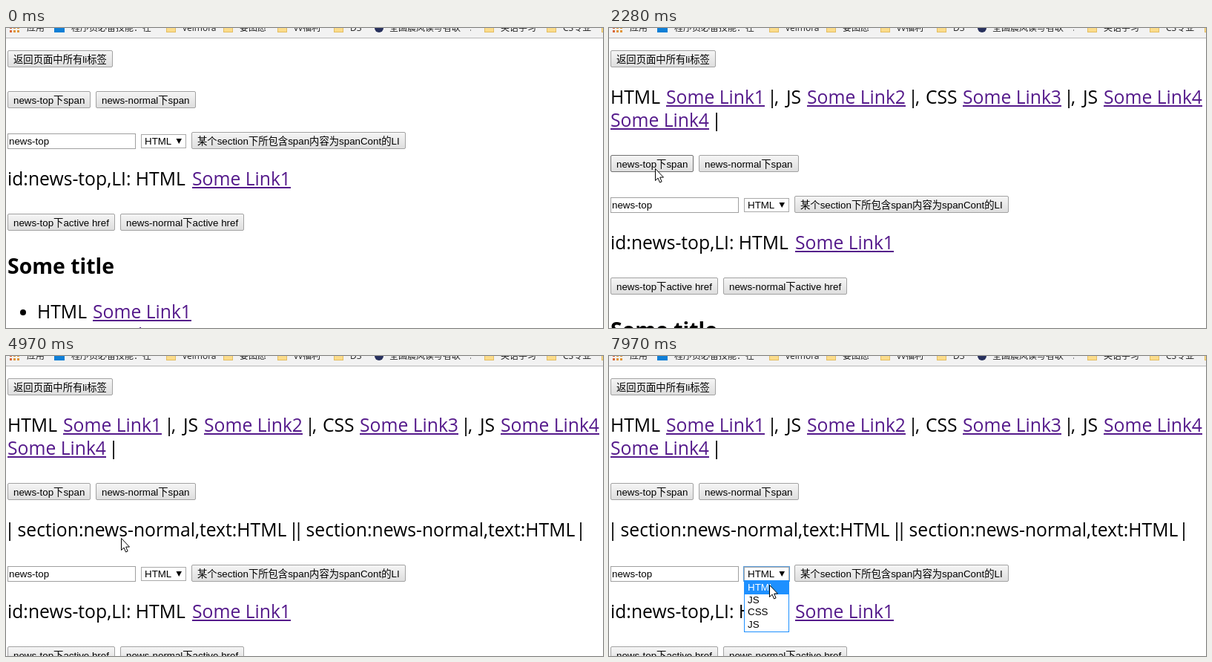
An HTML page with a canvas for the animation above (8 s loop, 805 px wide and 404 px high).

```html
<!DOCTYPE html>
<html lang="zh">
<head>
<meta charset="utf-8">
<style>
html, body { margin: 0; width: 100%; height: 100%; overflow: hidden; background: #fff; }
canvas { display: block; }
</style>
</head>
<body>
<canvas id="stage" width="805" height="404"></canvas>
<script>
const ctx = document.getElementById('stage').getContext('2d', { alpha: false });
const LOOP = 8000;
const CJK = '"Noto Sans CJK SC", "Noto Sans CJK JP", "Noto Sans CJK", sans-serif';
const BODY = '24.7px "Open Sans", ' + CJK;
const TITLE = 'bold 28.4px "Open Sans", ' + CJK;
const FORM = '13.333px "Liberation Sans", ' + CJK;
const MENU = '12px "Open Sans", ' + CJK;
const VISITED = '#551a8b';

// Pointer moves: start, end, number of steps, destination x, y
const moves = [
  [510, 1200, 10, 62, 36],
  [1520, 2280, 11, 62, 189],
  [2360, 2360, 1, 61, 188],
  [2510, 2510, 1, 62, 188],
  [3210, 3750, 8, 171, 191],
  [4050, 4210, 3, 185, 188],
  [4670, 5130, 7, 133, 288],
  [5430, 5740, 5, 271, 295],
  [5820, 6140, 5, 225, 292],
  [6360, 6510, 3, 335, 292],
  [6740, 6820, 2, 324, 287],
  [6900, 7510, 9, 231, 300],
  [7970, 7970, 1, 216, 308]
];
const presses = [[1200, 1350], [2980, 3060], [4360, 4440]];

let pointer, pressed;

function pointerAt(t) {
  let x = 540, y = 429;
  for (const [start, end, steps, toX, toY] of moves) {
    if (t < start) break;
    const done = t >= end ? steps : 1 + Math.floor((t - start) / (end - start) * (steps - 1) + 1e-6);
    x += (toX - x) * done / steps;
    y += (toY - y) * done / steps;
  }
  return { x: Math.round(x), y: Math.round(y), visible: t >= moves[0][0] };
}

function isOver(x, y, w, h) {
  return pointer.visible && pointer.x >= x && pointer.x < x + w && pointer.y >= y && pointer.y < y + h;
}

function rect(x, y, w, h, color) {
  ctx.fillStyle = color;
  ctx.fillRect(x, y, w, h);
}

function frame(x, y, w, h, color) {
  ctx.strokeStyle = color;
  ctx.lineWidth = 1;
  ctx.strokeRect(x + .5, y + .5, w - 1, h - 1);
}

function text(str, x, y, font = BODY, color = '#000') {
  ctx.font = font;
  ctx.fillStyle = color;
  ctx.fillText(str, x, y);
}

function bar(center, y) {
  ctx.textAlign = 'center';
  text('|', center, y);
  ctx.textAlign = 'left';
}

function link(n, x, y) {
  text('Some Link' + n, x, y, BODY, VISITED);
  rect(x, y + 2, 133, 2, VISITED);
}

function button(label, x, y, w) {
  const h = 23, over = isOver(x, y, w, h), down = over && pressed;
  const fill = ctx.createLinearGradient(0, y, 0, y + h);
  fill.addColorStop(0, down ? '#dcdcdc' : '#f6f6f6');
  fill.addColorStop(1, down ? '#eeeeee' : '#dddddd');
  ctx.beginPath();
  ctx.roundRect(x + .5, y + .5, w - 1, h - 1, 1.5);
  ctx.fillStyle = fill;
  ctx.fill();
  ctx.strokeStyle = over && !down ? '#707070' : '#a2a2a2';
  ctx.lineWidth = 1;
  ctx.stroke();
  text(label, x + 8, y + 17, FORM);
}

function toolbar() {
  rect(0, 0, 805, 13, '#f2f2f2');
  rect(0, 13, 805, 1, '#b8b8b8');
  for (let i = 0; i < 6; i++) rect(5 + i % 3 * 5, i < 3 ? -2 : 3, 3, 3, i % 3 ? '#e0953a' : '#d9683c');
  for (const x of [216, 293, 366, 442, 645, 729, 803]) {
    rect(x, -5, 13, 11, '#e3bd62');
    rect(x + 1, -4, 11, 9, '#fbdc8b');
  }
  rect(65, -8, 14, 14, '#0f7fd6');
  ctx.beginPath();
  ctx.arc(503, 0, 6, 0, 7);
  ctx.fillStyle = '#27305c';
  ctx.fill();
  const labels = [['应用', 28], ['程序员必备技能：在', 88], ['velmora', 238], ['宴图愿', 315], ['vv福利', 388],
    ['D3', 464], ['全国晨风读写者联', 517], ['英语学习', 667], ['CS专业', 751]];
  for (const [label, x] of labels) text(label, x, 4, MENU, '#222');
  rect(626, 2, 1, 2, '#888');
}

function selectBox(y, open) {
  rect(182, y, 61, 19, '#fff');
  frame(182, y, 61, 19, '#a9a9a9');
  if (open) frame(181, y - 1, 63, 21, '#5b9ddb');
  text('HTML', 187, y + 14, FORM);
  ctx.beginPath();
  ctx.moveTo(229.5, y + 6);
  ctx.lineTo(237, y + 6);
  ctx.lineTo(233.2, y + 13);
  ctx.fill();
  if (!open) return;
  rect(182, y + 19, 61, 69, '#fff');
  rect(183, y + 19, 59, 18, '#1e90ff');
  frame(182, y + 18, 61, 70, '#1e90ff');
  ['HTML', 'JS', 'CSS', 'JS'].forEach((item, i) =>
    text(item, 187, Math.round(y + 32 + i * 16.5), FORM, i ? '#000' : '#fff'));
}

function drawPointer() {
  const { x, y, visible } = pointer;
  if (!visible) return;
  if (isOver(2, 283, 173, 21)) {
    rect(x - 1, y - 8, 1, 16, '#000');
    for (const edge of [-9, 7]) {
      rect(x - 4, y + edge, 3, 1, '#000');
      rect(x, y + edge, 3, 1, '#000');
    }
    return;
  }
  const outline = [[0, 0], [0, 16], [3.6, 12.6], [6, 18.5], [8.6, 17.4], [6.2, 11.6], [11, 11.6]];
  ctx.beginPath();
  for (const [dx, dy] of outline) ctx.lineTo(x + dx + .5, y + dy + .5);
  ctx.closePath();
  ctx.fillStyle = '#fff';
  ctx.fill();
  ctx.strokeStyle = '#000';
  ctx.lineWidth = 1;
  ctx.stroke();
}

function listOutput() {
  [['HTML', 2, 77], ['JS', 239, 267], ['CSS', 427, 477], ['JS', 639, 667]].forEach(([tag, x, linkX], i) => {
    text(tag, x, 102);
    link(i + 1, linkX, 102);
    if (i < 3) {
      bar(linkX + 143, 102);
      text(',', linkX + 146, 102);
    }
  });
  link(4, 2, 133);
  bar(145, 133);
}

function spanOutput(section, starts, bars) {
  for (const x of starts) text(`section:${section},text:HTML`, x, 243);
  for (const x of bars) bar(x, 243);
}

function draw(t) {
  pointer = pointerAt(t);
  pressed = presses.some(([from, to]) => t >= from && t < to);
  const listed = t >= 1350, spanned = t >= 3060;
  const top = listed ? 86 : 0;
  const rest = top + (spanned ? 55 : 0);

  rect(0, 0, 805, 404, '#fff');
  toolbar();
  button('返回页面中所有li标签', 2, 30, 142);
  if (listed) listOutput();

  button('news-top下span', 2, 85 + top, 112);
  button('news-normal下span', 121, 85 + top, 135);
  if (t >= 4440) spanOutput('news-normal', [15.5, 404.5], [5, 388, 394.5, 775]);
  else if (spanned) spanOutput('news-top', [15.5], [5, 345.5]);

  frame(2, 142 + rest, 173, 21, '#a0a0a0');
  text('news-top', 4, 157 + rest, FORM);
  button('某个section下所包含span内容为spanCont的LI', 250, 140 + rest, 289);

  text('id:news-top,LI: HTML', 2, 212 + rest);
  link(1, 251, 212 + rest);
  button('news-top下active href', 2, 250 + rest, 145);
  button('news-normal下active href', 154, 250 + rest, 167);

  text('Some title', 2, 331 + rest, TITLE);
  ctx.beginPath();
  ctx.arc(23, 383 + rest, 4, 0, 7);
  ctx.fill();
  text('HTML', 42, 391 + rest);
  link(1, 117, 391 + rest);
  text('JS', 44, 422 + rest);
  link(2, 72, 422 + rest);

  selectBox(143 + rest, t >= 7740);
  drawPointer();
}

const began = performance.now();
function tick() {
  draw((performance.now() - began) % LOOP);
  requestAnimationFrame(tick);
}
tick();
</script>
</body>
</html>
```
